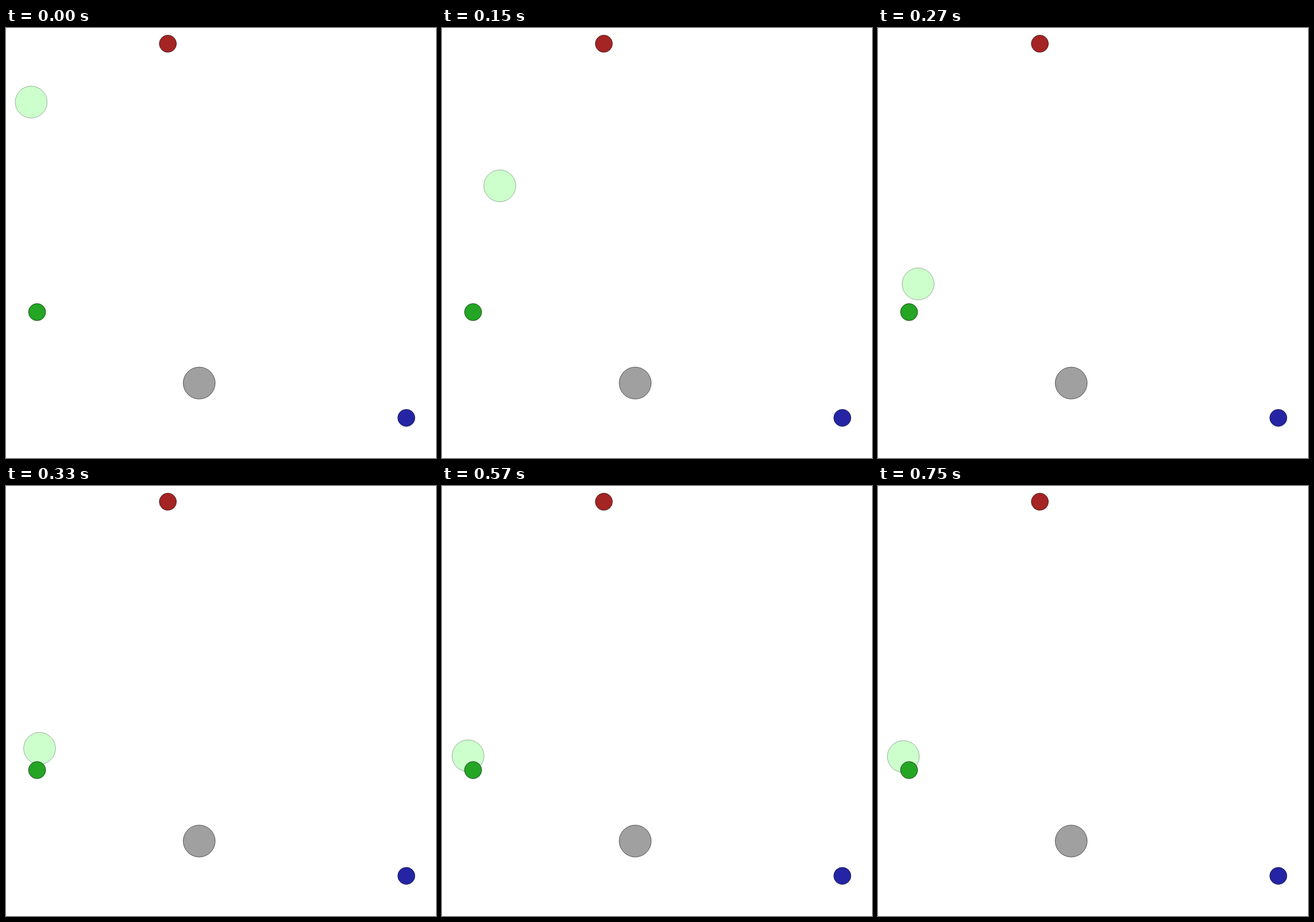
An HTML page that plays this animation: 700x700 px, repeating every 780 ms.

```html
<!DOCTYPE html>
<html>
<head>
<meta charset="utf-8">
<style>
  html, body { margin: 0; width: 100%; height: 100%; overflow: hidden; background: #fff; }
  svg { display: block; }
  circle { stroke: #000; stroke-opacity: .55; }
  #follower { stroke-opacity: .3; }
</style>
</head>
<body>
<svg width="700" height="700" viewBox="0 0 700 700">
  <circle id="follower" r="26" fill="#cfc"/>
  <circle cx="314.5" cy="578" r="26" fill="#a0a0a0"/>
  <circle cx="263.5" cy="25.6" r="14" fill="#a52424"/>
  <circle cx="50.6" cy="462.5" r="14" fill="#24a524"/>
  <circle cx="651.7" cy="634.7" r="14" fill="#2424a5"/>
</svg>
<script>
  const STEP = 30, LOOP = 780, EASE = 0.25;
  const START = { x: 41, y: 120.6 }, DROP = 320, OVERSHOOT = 62;
  const follower = document.getElementById('follower');

  // The chased point arcs to the right, drops past the end and snaps back
  function lead(n) {
    const moving = n <= 9;
    return {
      x: moving ? 82 * Math.max(0, Math.sin(Math.PI * n / 7.5)) : 0,
      y: moving ? Math.min(DROP + OVERSHOOT, 43.9 * n ** 1.1) : DROP
    };
  }

  function offset(steps) {
    let x = 0, y = 0;
    for (let n = 1; n <= steps; n++) {
      const goal = lead(n);
      x += (goal.x - x) * EASE;
      y += (goal.y - y) * EASE;
    }
    return { x, y };
  }

  function draw() {
    const { x, y } = offset(Math.floor(performance.now() % LOOP / STEP));
    follower.setAttribute('cx', START.x + x);
    follower.setAttribute('cy', START.y + y);
    requestAnimationFrame(draw);
  }
  draw();
</script>
</body>
</html>
```
